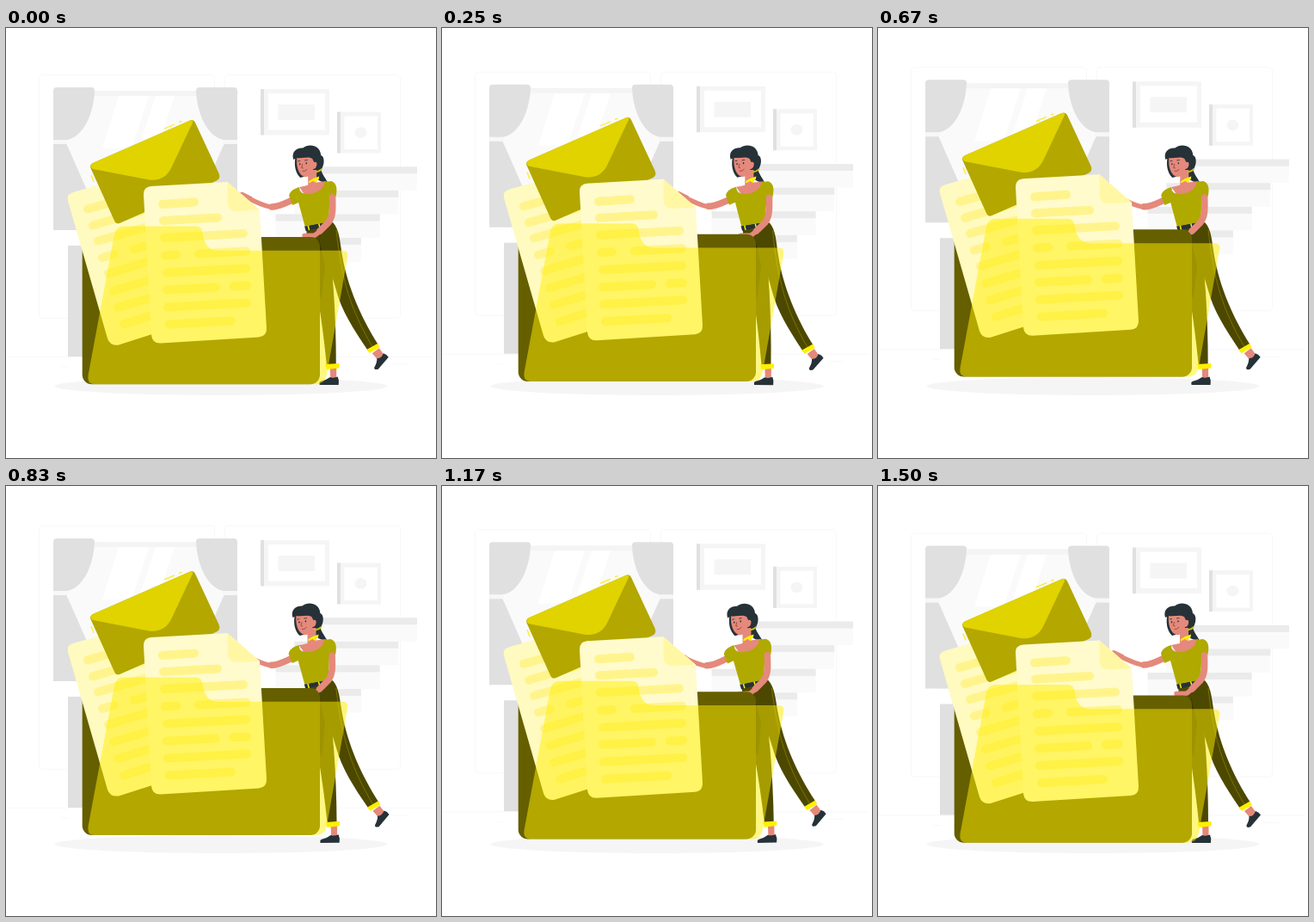
Animation, 500 px wide and 500 px high, one loop 1.54 s. Source, as an HTML page:

```html
<!DOCTYPE html>
<html lang="en">
<head>
<meta charset="utf-8">
<title>Folder</title>
<style>
html, body { margin: 0; width: 100%; height: 100%; overflow: hidden; background: #fff; }
svg { display: block; width: 100%; height: 100%; }
.skin { fill: #e4897b; }
.limb { fill: none; stroke: #e4897b; stroke-linecap: round; stroke-linejoin: round; }
.dark { fill: #263238; }
.pants { fill: #4d4800; }
.bright { fill: #fff000; }
.curtain { fill: #e0e0e0; }
.pale { fill: #f5f5f5; }
.white { fill: #fff; }
.lines { fill: none; stroke: #fff48c; stroke-width: 10; stroke-linecap: round; }
.hairline { fill: none; stroke: #f7f7f7; stroke-width: .8; }
</style>
</head>
<body>
<svg viewBox="0 0 500 500">
  <defs>
    <g id="drape" class="curtain">
      <path d="M55 73Q55 69 59 69H99Q103 69 103 73C102 98 91 126 71 130H55Z"/>
      <path d="M55 135H70.500L93 186L104 235H55Z"/>
    </g>
  </defs>

  <g class="float">
    <g class="hairline">
      <rect x="38.500" y="54.500" width="204" height="283" rx="4"/>
      <rect x="254.500" y="54.500" width="204" height="283" rx="4"/>
      <path d="M0 382.500H497M64 394H73M448 391H467"/>
    </g>
    <path d="M72 73H252V235H72Z" fill="#fafafa"/>
    <path class="white" d="M131 79H166L146 140H112ZM174 79H196L176 140H154Z"/>
    <path d="M98 73H226V79H98Z" fill="#f4f4f4"/>
    <path class="white" d="M55 130H71L70 135L93 186H70V135H55Z"/>
    <path d="M55 130H72V135H55ZM252 130H269V135H252Z" fill="#f7f7f7"/>
    <use href="#drape"/>
    <use href="#drape" transform="translate(324) scale(-1 1)"/>
    <path class="curtain" d="M72 253H100V382H72Z"/>

    <rect class="pale" x="296" y="71" width="80" height="53.500" rx="1"/>
    <path class="curtain" d="M296 71H300V124.500H296Z"/>
    <path class="white" d="M305 76H371V118.500H305Z"/>
    <path class="pale" d="M316.500 89H359V107H316.500Z"/>
    <rect class="pale" x="385" y="97.500" width="51" height="48" rx="1"/>
    <path class="curtain" d="M385 97.500H389V145.500H385Z"/>
    <path class="white" d="M393.500 102.500H432V141H393.500Z"/>
    <ellipse class="pale" cx="412.500" cy="121.500" rx="7" ry="6.300"/>
    <g id="stairs"></g>
  </g>

  <ellipse class="pale" cx="250" cy="416.500" rx="193.500" ry="10.500"/>

  <g id="woman">
    <path class="limb" stroke-width="7.500" d="M335 199C326 203 318 208 309 208"/>
    <path class="limb" stroke-width="5.500" d="M312 208.500C302 209 291 202 282 198.500"/>
    <path class="skin" d="M285 201L279 198L272 192.500Q272 190 276 191.500L286 196.500Z"/>

    <path class="skin" d="M426 378L434 372L440 380L432 385Z"/>
    <path class="dark" d="M439 378Q443 379 445 382.500L433 396.500Q428 398 428.500 394.500Q432 388 431.500 384Q437 384 439 378Z"/>
    <path class="pants" d="M366 232L380 226C388 235 388 248 391 265C397 300 413 337 433 368L421 375C404 350 390 328 384 305Q373 270 366 232Z"/>
    <path d="M384 235C390 292 401 328 426 370" fill="none" stroke="#8f8600" stroke-width=".7"/>
    <path class="bright" d="M419.500 374L432.500 366.500L435 371L423 378Z"/>

    <path class="skin" d="M377 395H384.500V407H377.500Z"/>
    <path class="dark" d="M366 411Q372 410 377 406Q381 407.500 386 405.500Q388 410 387 415H365Q364 412 366 411Z"/>
    <path class="pants" d="M349 234L375 227C380 250 378 270 381 305Q384 350 384 391H373C368 340 360 295 351 250Z"/>
    <path d="M364 245L371 276L367 315L360 300Z" fill="#2e2b00" opacity=".6"/>
    <path class="bright" d="M371.500 391L387.500 390L387.500 395.500L373 397Z"/>

    <path class="dark" d="M347 230.500L372 225.500L373 230.500L348.500 236Z"/>
    <path d="M351 229.500L352.500 235M363.500 227L365 232.500" stroke="#fff000" stroke-width="1.500"/>

    <path class="dark" d="M334 153C331 143 339 139 345 139.500C352 134 365 136 366 148C371 150 370 160 366 165C368 171 371 174 373.500 179C367 180 361 177 358 170L342 174C336 168 335 160 336 152Z"/>
    <path class="skin" d="M351 165H361V186H351Z"/>
    <path class="skin" d="M341 185C348 184 354 182 358 180L372 178L374 186L368 195H348Z"/>
    <path d="M341 185C334 187 330 190 329 195L333 206L340 203L347.500 230.500L375 225.500L376.500 197L383.500 196C385.500 186 384 180 378 178L370 179C371 189 352 197 343 191Q341 189 341 185Z" fill="#b0a900"/>
    <path class="skin" d="M338 151C344 152 351 149 356 152L358 156Q362 155 361 160Q360 164 357 164C356 170 351 174 347 173C340 171 337 161 338 151Z"/>
    <path class="dark" d="M335 150Q344 152 355 149L361 151L359 146Q347 142 335 147Z"/>
    <ellipse class="dark" cx="341.500" cy="158.300" rx=".8" ry="1.100"/>
    <ellipse class="dark" cx="349" cy="157.300" rx=".8" ry="1.100"/>
    <path d="M339 155L342 154.500M347 154L350.500 153.500" stroke="#263238" stroke-width=".8"/>
    <path d="M344.500 158L343.500 162.500L345.500 163M344.500 166.500Q348 167 350 164" fill="none" stroke="#8a3f35" stroke-width=".8"/>
    <path class="bright" d="M352 178L357 175L364 172.500L363.500 176L360.500 177.500L361 180.500L357 178L352 180.500Z"/>
    <path d="M359.500 167Q363 168 367 164" fill="none" stroke="#c8be00" stroke-width="2"/>

    <path class="limb" stroke-width="7.500" d="M379.500 197C380 212 380 219 375 226L365 236"/>
    <path class="limb" stroke-width="5.500" d="M368 234L359 241L347 241.500"/>
  </g>

  <g class="float">
    <rect x="88.700" y="243" width="276.300" height="171.200" rx="11" fill="#665f00"/>

    <path d="M72 201Q70 193 78 191L200 156L245 332L131 368.500Q121 370 118 361Z" fill="#fffabf"/>
    <path class="lines" d="M95 210.500L150 195M101 229.500L160 212M107 247.500L165 231M112 267L126 263M149 257L167 252M119 285.500L167 271M125 305.500L167 293M130 325L167 314M137 344.500L167 335"/>

    <path d="M98.500 163Q97 159 101 157L213 108Q218 105.500 220 110L247.500 169Q250 175 245 177.500L132 227Q128 228.500 126 224Z" fill="#b3a700"/>
    <path d="M98.500 161Q98 158 102 156.500L213 108Q218 106 217 110L193 161Q185 179 166 176.500L104 164.500Q99 164 98.500 161Z" fill="#e0d300"/>
    <path d="M184 117L196 112M201 109.500L204.500 108.500M99 171L102 179" stroke="#ffec20" stroke-width="1.300"/>

    <path d="M160 194Q159.500 185 168.500 184L257.500 179L295 211.500L303 349Q303.500 358.500 294 359.500L180 366.500Q170 367 169 357Z" fill="#fffbcc"/>
    <path d="M257.500 179V202Q258 213.500 269 213L295 211.500Z" fill="#fff7a4"/>
    <path class="lines" d="M182 205L219 202.500M183 224L246 220.500M184 244L276 239M185 264.500L198 263.500M224 262.500L279 259.500M187 284.500L279 279.500M187 304.500L244 301.500M265 300.300L280 299.500M188 324.500L280 319.500M190 344.500L262 340.500"/>

    <path d="M137 230.500H220C231 230.500 227 240 232 250Q236 258.800 247 258.800H391Q399 258.800 397 267L373 403Q371 414.200 360 414.200H103Q94 414.200 95.500 404L126 240Q128 230.500 137 230.500Z" fill="#fff000" opacity=".5"/>
  </g>
</svg>
<script>
const LOOP = 1540, STEPS = 37, STEP_MS = 1500 / 36;

// Four treads, each shorter and lower than the one above.
document.getElementById('stairs').innerHTML = [0, 1, 2, 3].map(i => {
  const x = 357 - 21.700 * i, y = 161.300 + 27.600 * i, w = 478 - 21.700 * i - x;
  return `<rect x="${x}" y="${y}" width="${w}" height="27.600" fill="#fafafa"/>
    <rect x="${x}" y="${y}" width="${w}" height="8" fill="#ebebeb"/>`;
}).join('');

const floating = document.querySelectorAll('.float');
const woman = document.getElementById('woman');

function draw(now) {
  const step = Math.min(STEPS - 1, Math.floor((now % LOOP + 4) / STEP_MS));
  const phase = (step + 1) / STEPS;
  const rise = 10 * (1 - Math.abs(1 - 2 * phase));
  const tilt = phase < .25 ? 4 * phase : phase < .75 ? 2 - 4 * phase : 4 * phase - 4;
  floating.forEach(g => g.setAttribute('transform', `translate(0 ${.54 - rise})`));
  woman.setAttribute('transform', `rotate(${tilt} 359 275)`);
}

const start = performance.now();
function tick() {
  draw(performance.now() - start);
  requestAnimationFrame(tick);
}
tick();
</script>
</body>
</html>
```
